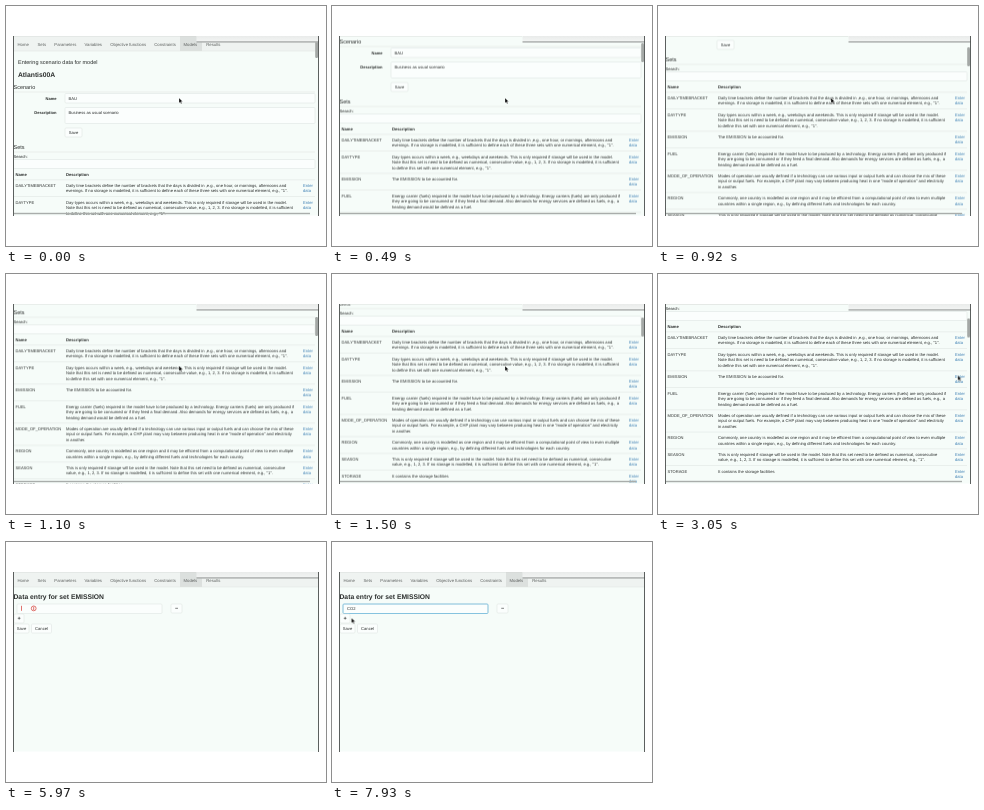
An HTML page that plays this animation: 320x240 px, repeating every 7.99 s.

```html
<!DOCTYPE html>
<html lang="en">
<head>
<meta charset="utf-8">
<title>Scenario data entry</title>
<style>
  html, body { margin: 0; width: 100%; height: 100%; overflow: hidden; background: #fff; }
  svg { display: block; width: 320px; height: 240px; }
  text { font: 4.15px "Liberation Sans", Arial, sans-serif; fill: #2b2e2d; dominant-baseline: central; text-rendering: geometricPrecision; white-space: pre; }
  .b { font-weight: bold; }
  .h { font-size: 5.5px; }
  .title { font-size: 6.75px; }
  .key { font-size: 4.05px; }
  .nav { font-size: 4.25px; fill: #5d605f; }
  .link { fill: #3f81b4; }
  .mid { text-anchor: middle; }
  .end { text-anchor: end; }
  .box { fill: #fbfefd; stroke: #dbe1de; stroke-width: .5; }
  .line { stroke: #dce2df; stroke-width: .5; }

  .loop { animation: 7.99s linear infinite; }
  .cut { animation-timing-function: step-end; }
  #list { animation-name: list; }
  #scroll { animation-name: scroll; }
  #thumb { animation-name: thumb; }
  #entry { animation-name: entry; }
  #row { animation-name: row; }
  #below { animation-name: below; }
  #focus { animation-name: focus; }
  #mark { animation-name: mark; }
  #c1 { animation-name: c1; }
  #c2 { animation-name: c2; }
  #c3 { animation-name: c3; }
  #mouse { animation-name: move; }
  #arrow { animation-name: arrow; }

  @keyframes list { 0% { visibility: visible } 49.44%, 100% { visibility: hidden } }
  @keyframes entry { 0% { visibility: hidden } 49.44%, 100% { visibility: visible } }
  @keyframes scroll {
    0%, .75% { transform: translateY(0) }
    9.64% { transform: translateY(-75px) }
    13.77% { transform: translateY(-102.7px) }
    20% { transform: translateY(-113.5px) }
    26%, 100% { transform: translateY(-116px) }
  }
  @keyframes thumb {
    0%, .75% { transform: translateY(0) }
    13.77% { transform: translateY(10px) }
    26%, 100% { transform: translateY(11.5px) }
  }
  @keyframes row { 0% { opacity: 0 } 65.71%, 100% { opacity: 1 } }
  @keyframes below { 0% { transform: translateY(0) } 65.71%, 100% { transform: translateY(10px) } }
  @keyframes focus { 0% { opacity: 0 } 76.72%, 100% { opacity: 1 } }
  @keyframes mark { 0% { opacity: 0 } 71.34% { opacity: 1 } 85.48%, 100% { opacity: 0 } }
  @keyframes c1 { 0% { opacity: 0 } 85.48%, 100% { opacity: 1 } }
  @keyframes c2 { 0% { opacity: 0 } 87.86%, 100% { opacity: 1 } }
  @keyframes c3 { 0% { opacity: 0 } 92.99%, 100% { opacity: 1 } }
  @keyframes arrow { 0% { opacity: 1 } 71.34% { opacity: 0 } 95.37%, 100% { opacity: 1 } }
  @keyframes move {
    0%, 27.5% { transform: translate(173px, 92px); animation-timing-function: ease-in-out }
    36.9%, 55.2% { transform: translate(299.8px, 101.5px) }
    57.45% { transform: translate(81.5px, 65.3px) }
    60.7%, 68.84% { transform: translate(12.5px, 65px) }
    71.34% { transform: translate(28px, 64px) }
    71.35%, 95.37% { transform: translate(87px, 61px) }
    98.87%, 100% { transform: translate(19.5px, 76px) }
  }
</style>
</head>
<body>
<svg viewBox="0 0 320 240">
  <defs>
    <clipPath id="win"><rect x="7" y="30" width="306" height="179.5"/></clipPath>
    <linearGradient id="shade" x2="0" y2="1">
      <stop offset="0" stop-color="#e9ebea"/>
      <stop offset=".6" stop-color="#f1f3f2"/>
      <stop offset=".8" stop-color="#9c9f9e"/>
      <stop offset="1" stop-color="#d5d8d7" stop-opacity="0"/>
    </linearGradient>
    <g id="nav"></g>
  </defs>
  <g clip-path="url(#win)">
    <rect x="7" y="30" width="306" height="180" fill="#f6fcf9"/>
    <g id="list" class="loop cut">
      <g id="scroll" class="loop"><use href="#nav"/><g id="page"></g></g>
      <rect x="8" y="206.8" width="296" height="1.4" fill="#a9adab"/>
      <rect id="thumb" class="loop" x="309.2" y="33" width="2.8" height="19" rx="1.2" fill="#a4a8a6"/>
    </g>
    <g id="entry" class="loop cut">
      <use href="#nav"/>
      <g id="head"></g>
      <g id="row" class="loop cut">
        <rect class="box" x="11" y="62" width="145" height="9.5" rx="1"/>
        <rect id="focus" class="loop cut" x="11" y="62" width="145" height="9.5" rx="1" fill="none" stroke="#86c3df" stroke-width="1"/>
        <g id="mark" class="loop cut" fill="none" stroke="#d8504a" stroke-width=".8">
          <path d="M15.5 63.8v5M27.7 64.8v3.2"/>
          <circle cx="27.7" cy="66.4" r="2.4"/>
        </g>
        <text id="c1" class="loop cut" x="15" y="66.7">C</text>
        <text id="c2" class="loop cut" x="18" y="66.7">O</text>
        <text id="c3" class="loop cut" x="21.2" y="66.7">2</text>
        <g id="minus"></g>
      </g>
      <g id="below" class="loop cut"></g>
    </g>
    <rect x="190.5" y="30" width="123" height="7.5" fill="url(#shade)"/>
    <path d="M7 30.2H190" stroke="#cfd3d1" stroke-width=".5"/>
    <path d="M7.5 30V210M312.5 30V210" stroke="#4b4e4d" stroke-width=".9"/>
    <g id="mouse" class="loop">
      <path id="arrow" class="loop cut" d="M0 0V5L1.2 3.9 2 5.8 2.9 5.4 2.1 3.6H3.6Z" fill="#111" stroke="#fff" stroke-width=".25"/>
    </g>
  </g>
</svg>
<script>
const NS = "http://www.w3.org/2000/svg";
const el = id => document.getElementById(id);

function add(parent, tag, attrs, label = "") {
  const node = document.createElementNS(NS, tag);
  for (const key in attrs) node.setAttribute(key, attrs[key]);
  node.textContent = label;
  el(parent).append(node);
}
const text = (parent, x, y, label, cls = "") => add(parent, "text", { x, y, class: cls }, label);
const box = (parent, x, y, width, height) => add(parent, "rect", { x, y, width, height, rx: 1, class: "box" });
const rule = (parent, x, y, x2) => add(parent, "path", { d: `M${x} ${y}H${x2}`, class: "line" });
function button(parent, x, y, w, label, cls = "") {
  box(parent, x, y, w, 9);
  text(parent, x + w / 2, y + 4.6, label, "mid " + cls);
}

// Navigation bar
add("nav", "rect", { x: 7, y: 30, width: 306, height: 15, fill: "#eff3f1" });
add("nav", "rect", { x: 174, y: 30, width: 22, height: 15, fill: "#dce0de" });
rule("nav", 7, 45, 313);
[["Home", 11.5], ["Sets", 31.5], ["Parameters", 48.3], ["Variables", 78.5], ["Objective functions", 104.3],
 ["Constraints", 148.3], ["Models", 177.5], ["Results", 200.3]]
  .forEach(([label, x]) => text("nav", x, 38, label, "nav"));

// Scenario form
text("page", 12, 57, "Entering scenario data for model", "h");
text("page", 12, 69.5, "Atlantis00A", "title b");
text("page", 7.5, 82, "Scenario", "h");
rule("page", 7, 86, 309);
text("page", 50.5, 92.3, "Name", "b end key");
box("page", 59, 87.5, 250, 9.5);
text("page", 62.5, 92.3, "BAU");
text("page", 50.5, 106, "Description", "b end key");
box("page", 59, 101.5, 250, 16);
text("page", 62.5, 106, "Business as usual scenario");
button("page", 59, 122, 17, "Save");
text("page", 7.5, 142, "Sets", "h");
rule("page", 7, 146, 309);
text("page", 7.5, 150.2, "Search:");
box("page", 7.5, 153.5, 301.5, 9);

// Table of sets
const sets = [
  ["DAILYTIMEBRACKET",
    "Daily time brackets define the number of brackets that the days is divided in ,e.g., one hour, or mornings, afternoons and",
    "evenings. If no storage is modelled, it is sufficient to define each of these three sets with one numerical element, e.g., \"1\"."],
  ["DAYTYPE",
    "Day-types occurs within a week, e.g., weekdays and weekends. This is only required if storage will be used in the model.",
    "Note that this set is need to be defined as numerical, consecutive value, e.g., 1, 2, 3. If no storage is modelled, it is sufficient",
    "to define this set with one numerical element, e.g., \"1\"."],
  ["EMISSION", "The EMISSION to be accounted for."],
  ["FUEL",
    "Energy carrier (fuels) required in the model have to be produced by a technology. Energy carriers (fuels) are only produced if",
    "they are going to be consumed or if they feed a final demand. Also demands for energy services are defined as fuels, e.g., a",
    "heating demand would be defined as a fuel."],
  ["MODE_OF_OPERATION",
    "Modes of operation are usually defined if a technology can use various input or output fuels and can choose the mix of these",
    "input or output fuels. For example, a CHP plant may vary between producing heat in one \"mode of operation\" and electricity",
    "in another."],
  ["REGION",
    "Commonly, one country is modelled as one region and it may be efficient from a computational point of view to even multiple",
    "countries within a single region, e.g., by defining different fuels and technologies for each country."],
  ["SEASON",
    "This is only required if storage will be used in the model. Note that this set need to be defined as numerical, consecutive",
    "value, e.g., 1, 2, 3. If no storage is modelled, it is sufficient to define this set with one numerical element, e.g., \"1\"."],
  ["STORAGE", "It contains the storage facilities"]
];
const LINE = 5.6;
text("page", 9.5, 168, "Name", "b");
text("page", 60, 168, "Description", "b");
let top0 = 173.8;
for (const [name, ...lines] of sets) {
  const y = top0 + 5.5;
  rule("page", 7, top0, 309);
  text("page", 9.5, y, name, "key");
  lines.forEach((line, i) => text("page", 60, y + i * LINE, line));
  text("page", 297, y, "Enter", "link");
  text("page", 297, y + LINE, "data", "link");
  top0 += 5.5 + LINE * Math.max(2, lines.length);
}

// Data entry form
text("head", 7.5, 55.3, "Data entry for set EMISSION", "title b");
button("minus", 165, 62, 11, "\u2212", "h b");
button("below", 8, 62, 10, "+", "h b");
button("below", 8, 72, 15, "Save");
button("below", 25.5, 72, 20, "Cancel");
</script>
</body>
</html>
```
